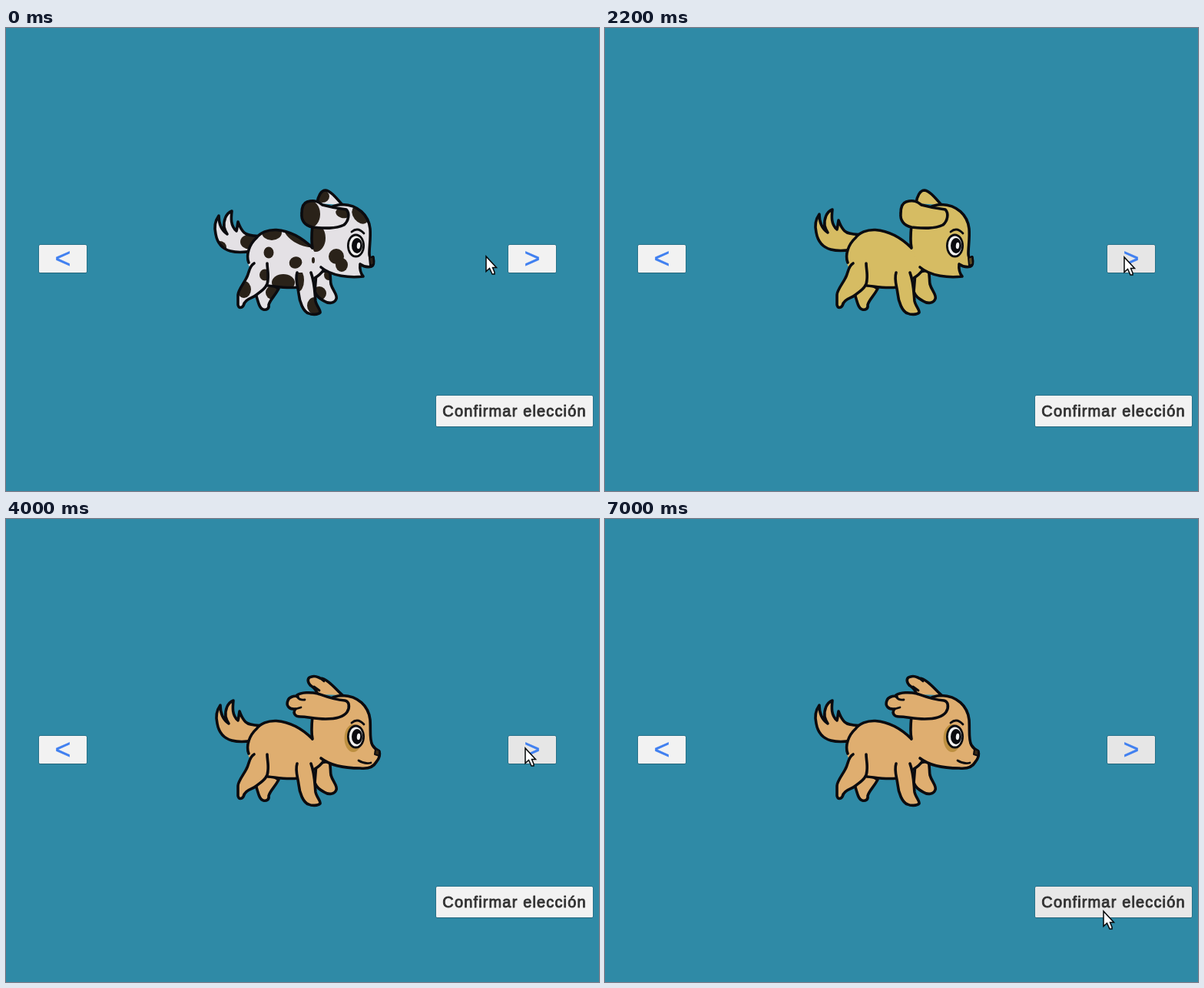
Recreate the animation shown at these times as an HTML page with a canvas. Size 772x602 px, loop 7100 ms.

```html
<!DOCTYPE html>
<html lang="es">
<head>
<meta charset="utf-8">
<title>Elegir mascota</title>
<style>
html, body { margin: 0; width: 100%; height: 100%; overflow: hidden; background: #2f8aa6; }
canvas { display: block; }
</style>
</head>
<body>
<canvas id="stage" width="772" height="602"></canvas>
<script>
const ctx = document.getElementById('stage').getContext('2d');
const LOOP = 7100, STEP = 100;
const INK = '#0b0b0f', SPOT = '#2a2219';
const FONT = '"Liberation Sans", Arial, sans-serif';

// Shared body parts: d is filled and stroked, line replaces the stroke
const BODY = [
  { id: 'farHind', d: 'M325 346C328 353 329 365 335 366C339 367 343 365 342 360C344 353 349 350 355 339L340 330Z' },
  { id: 'farFront', d: 'M402 343C405 350 409 352 414 355C420 359 428 358 430 352C432 347 425 341 423 333C422 327 423 322 421 315L404 318Z' },
  { id: 'tail', d: 'M335 269C324 268 316 268 312 264C307 259 306 255 304 250C303 255 303 259 302 262C294 255 295 245 296 236C288 239 285 249 286 257C287 261 288 263 290 266C281 260 279 251 279 242C274 249 273 258 275 266C277 277 283 285 294 288C302 290 311 290 322 288' },
  { id: 'body',
    d: 'M399 285C385 272 371 264 352 262.5C341 262 331 266 326 273C317 281 312 295 316 309L340 335C352 337 365 339 380 337L402 326L414 314Z',
    line: 'M399 286C385 272 371 264 352 262.5C341 262 331 266 326 273C317 281 312 295 316 305M341 335C352 336 365 339 380 337M414 314Q409 321 402 325' },
  { id: 'hind', d: 'M323 306C316 310 317 318 313 325C309 333 302 341 302 347L302 360C303 365 307 364 309 361C311 352 320 352 326 347C333 341 341 337 341 327C342 319 340 313 340 306' },
  { id: 'front', d: 'M379 318C376 327 380 336 381 345C382 356 387 369 394 371C398 373 406 373 409 370C410 367 404 361 403 355C402 346 402 331 397 318' }
];

const ROUND = {
  backEar: 'M405 228C406 219 410 211 416 211C423 212 430 221 438 230',
  head: 'M399 286C397 277 398 266 399 256C407 239 424 230 438 229.500C458 230 472 243 474 261C475 273 473 284 473 293Q473 301 478 298Q480 308 476 310Q468 312 461 307Q460 317 465 323C448 325 424 323 410 311',
  ear: 'M392 226C402 223 407 226 412 230C423 233 434 235 443 236C448 241 446 251 440 256C428 262 411 260 399 259C389 257 384 250 385 241C385 234 386 228 392 226Z',
  detail: '',
  nose: 'M473 299L478 297L479 307L474 309Z'
};
const LONG = {
  backEar: 'M405 228C405 222 400 219 396 216C392 211 392 206 398 205C403 203 406 206 409 207C418 207 429 221 438 229',
  head: 'M399 286C397 277 398 266 399 256C407 239 424 230 438 229.500C458 230 472 243 474 261C475 273 473 288 477 294Q480 299 486 302Q488 309 482 316C478 323 470 325 461 324C445 324 424 322 410 311',
  ear: 'M380 231C375 229 368 232 367 236C364 243 369 248 377 247C373 252 376 257 383 257C393 257 401 260 416 260C428 260 439 258 444 251C448 245 447 237 441 236C427 235 417 231 406 227C397 225 384 225 379 229Z',
  detail: 'M379 231Q382 236 389 235M377 247L384 245M401 218L408 223M409 207L414 211M459 314Q467 319 475 317',
  nose: 'M481 299L486 301L486 308L480 306Z'
};

// Spots: x, y, rx, ry, turn
const PATCHY = {
  tail: [[280, 283, 9, 8], [320, 276, 13, 10]],
  body: [[346, 266, 13, 10], [383, 271, 23, 10, .5], [342, 292, 6.5, 7.5], [377, 305, 8.5, 7.5, -.4], [361, 331, 15, 11], [400, 302, 2, 4]],
  hind: [[310, 340, 9, 11], [337, 321, 7, 7.5]],
  farHind: [[347, 344, 9, 9]],
  front: [[380, 328, 8, 15], [402, 361, 10, 11]],
  farFront: [[408, 345, 9, 9], [420, 321, 6, 7]],
  head: [[403, 273, 13, 18], [430, 297, 10, 10], [437, 308, 8, 9], [461, 243, 13, 9, .9]],
  ear: [[395, 242, 14, 18], [438, 241, 9, 6, .3]],
  backEar: [[412, 219, 9, 8]]
};
const DOTTED = {
  tail: [[276, 271, 6, 6], [323, 269, 9, 8]],
  body: [[351, 265, 8, 9], [363.5, 294, 9, 10], [362, 333, 10, 8], [342, 327, 5, 7]],
  hind: [[311, 327, 8, 10], [341, 327, 4, 6]],
  farHind: [[347, 350, 6, 7]],
  front: [[379, 326, 5, 9], [398, 354, 8.5, 10]],
  farFront: [[408, 350, 5, 6], [420, 324, 5, 6]],
  head: [[399, 272, 7, 11], [423.500, 277, 7.5, 8], [438, 310, 7.5, 7.5], [468, 247, 6, 10, -.6]],
  ear: [[396, 239, 12.5, 14]],
  backEar: [[432, 224, 7, 6]]
};
const DOGS = [
  { from: 0, coat: '#e4e1e5', face: ROUND, spots: PATCHY, tail: [-2, 2], nose: SPOT },
  { from: 800, coat: '#e4e1e5', face: ROUND, spots: DOTTED, nose: '#e4e1e5' },
  { from: 1600, coat: '#d6bc63', face: ROUND, nose: '#5b4a22' },
  { from: 3000, coat: '#97909d', face: LONG, nose: '#1d1c20' },
  { from: 3900, coat: '#dfae70', face: LONG, nose: '#3a2a16', spots: { head: [[452, 285, 11.5, 18]] }, patch: '#bd8f40' }
];

// Time, then values; eased pieces are used for the pointer
const RIGHT = [[0, 242], [200, 242], [300, 230], [600, 230], [700, 196], [800, 196], [1000, 230],
  [1300, 230], [1500, 196], [1700, 230], [2700, 230], [2900, 196], [3000, 220], [3100, 230],
  [3500, 230], [3700, 196], [3800, 196], [4000, 230]];
const CONFIRM = [[0, 242], [4800, 242], [4900, 232]];
const POINTER = [[0, 624, 296], [500, 675, 297], [4400, 675, 297], [5100, 664, 493], [6500, 664, 493], [7000, 648, 509]];
const smooth = k => k * k * (3 - 2 * k);

function track(keys, t, ease = k => k) {
  const i = keys.findIndex(k => k[0] > t);
  if (i < 0) return keys[keys.length - 1].slice(1);
  const a = keys[i - 1], b = keys[i], k = ease((t - a[0]) / (b[0] - a[0]));
  return a.slice(1).map((v, j) => v + (b[j + 1] - v) * k);
}

function oval(x, y, rx, ry, turn, fill) {
  ctx.beginPath();
  ctx.ellipse(x, y, rx, ry, turn || 0, 0, 7);
  ctx.fillStyle = fill;
  ctx.fill();
}

function drawPart(dog, { id, d, line }) {
  const shape = new Path2D(d);
  ctx.save();
  if (id === 'tail' && dog.tail) ctx.translate(...dog.tail);
  ctx.fillStyle = dog.coat;
  ctx.fill(shape);
  ctx.save();
  ctx.clip(shape);
  for (const [x, y, rx, ry, turn] of (dog.spots && dog.spots[id]) || [])
    oval(x, y, rx, ry, turn, dog.patch || SPOT);
  ctx.restore();
  ctx.stroke(line ? new Path2D(line) : shape);
  ctx.restore();
}

function drawDog(dog) {
  const face = dog.face;
  ctx.strokeStyle = INK;
  ctx.lineWidth = 3.6;
  ctx.lineCap = ctx.lineJoin = 'round';
  drawPart(dog, { id: 'backEar', d: face.backEar });
  BODY.forEach(part => drawPart(dog, part));
  drawPart(dog, { id: 'head', d: face.head });

  const nose = new Path2D(face.nose);
  ctx.fillStyle = dog.nose;
  ctx.fill(nose);
  ctx.lineWidth = 2;
  ctx.stroke(nose);

  oval(455.5, 283, 11.5, 15.5, 0, INK);
  oval(455.5, 283, 8.8, 12.6, 0, '#f4f3f2');
  oval(457, 283, 7, 10, 0, INK);
  oval(459, 283, 2.2, 4.2, .1, '#f4f3f2');
  ctx.lineWidth = 2.8;
  ctx.stroke(new Path2D('M450 265Q458 258 466 267'));

  ctx.lineWidth = 3.6;
  drawPart(dog, { id: 'ear', d: face.ear });
  ctx.lineWidth = 2.8;
  ctx.stroke(new Path2D(face.detail));
}

function drawButton(x, y, w, h, shade) {
  ctx.fillStyle = 'rgba(20,50,62,.55)';
  ctx.beginPath();
  ctx.roundRect(x - .5, y - .5, w + 1, h + 1.3, 2);
  ctx.fill();
  const v = Math.round(shade);
  ctx.fillStyle = `rgb(${v},${v},${v})`;
  ctx.beginPath();
  ctx.roundRect(x, y, w, h, 1.5);
  ctx.fill();
}

function label(text, x, y, size, color, weight) {
  ctx.font = `${size}px ${FONT}`;
  ctx.fillStyle = ctx.strokeStyle = color;
  ctx.lineWidth = weight;
  ctx.lineJoin = 'round';
  ctx.fillText(text, x, y);
  ctx.strokeText(text, x, y);
}

function arrowButton(sign, x, shade) {
  drawButton(x, 282, 62, 36, shade);
  ctx.font = `36px ${FONT}`;
  const m = ctx.measureText(sign);
  label(sign, x + 31 + (m.actualBoundingBoxLeft - m.actualBoundingBoxRight) / 2,
    300.3 + (m.actualBoundingBoxAscent - m.actualBoundingBoxDescent) / 2, 36, '#3f7ff0', .4);
}

function drawPointer(x, y) {
  ctx.save();
  ctx.translate(Math.round(x) + 1, Math.round(y) + 1);
  const p = new Path2D('M0 0V19.500L4.500 15.500L8 23H11V20.500L8.500 14.500H13.500Z');
  ctx.lineJoin = 'miter';
  ctx.lineWidth = 1.5;
  ctx.strokeStyle = '#05080a';
  ctx.fillStyle = '#fff';
  ctx.fill(p);
  ctx.stroke(p);
  ctx.restore();
}

function render(t) {
  ctx.fillStyle = '#2f8aa6';
  ctx.fillRect(0, 0, 772, 602);
  drawDog(DOGS.filter(d => d.from <= t).pop());
  arrowButton('<', 43, 242);
  arrowButton('>', 654, track(RIGHT, t)[0]);
  drawButton(560, 478, 204, 40, track(CONFIRM, t)[0]);
  ctx.letterSpacing = '1.15px';
  label('Confirmar elección', 568.3, 505, 20, '#323232', .9);
  ctx.letterSpacing = '0px';
  drawPointer(...track(POINTER, t, smooth));
}

const start = performance.now();
function tick() {
  const t = (performance.now() - start) % LOOP;
  render(Math.floor(t / STEP) * STEP);
  requestAnimationFrame(tick);
}
tick();
</script>
</body>
</html>
```
